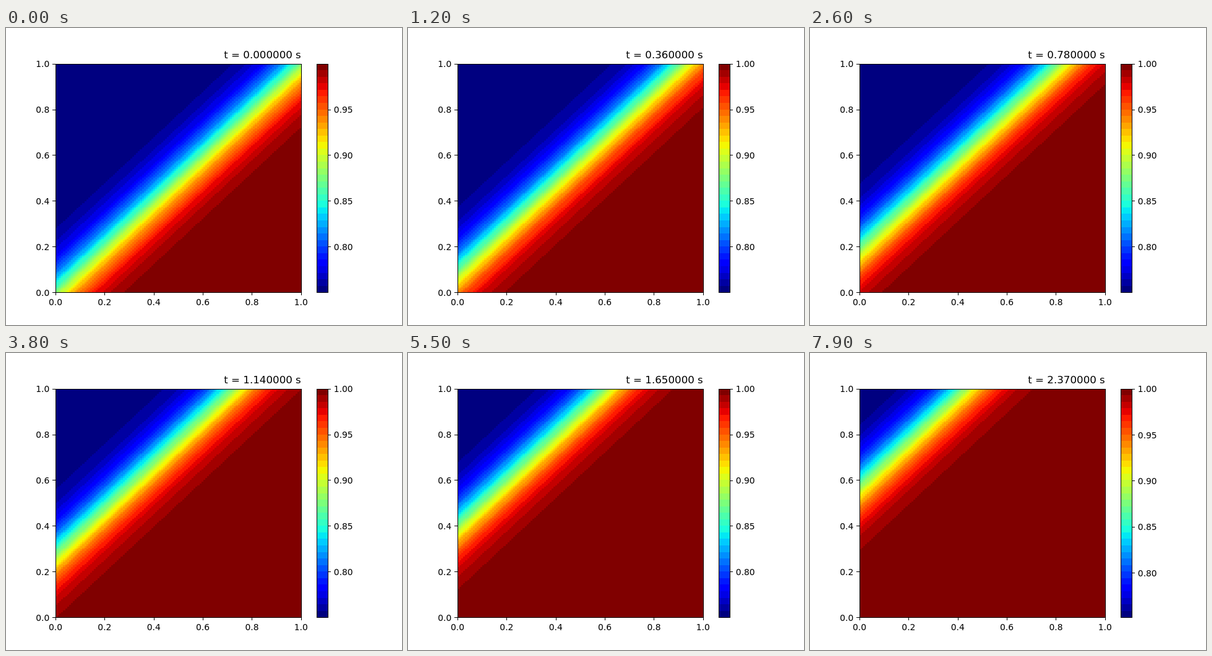
Recreate the animation shown at these times as an HTML page with a canvas. Size 640 px wide and 480 px high, loop 8000 ms.

```html
<!DOCTYPE html>
<html>
<head>
<meta charset="utf-8">
<style>
html, body { margin: 0; width: 100%; height: 100%; overflow: hidden; background: #fff; }
canvas { display: block; }
</style>
</head>
<body>
<canvas id="stage" width="640" height="480"></canvas>
<script>
const ctx = document.getElementById('stage').getContext('2d');
const CELLS = 128, LEVELS = 35, STEEP = 12.5, SPEED = 0.245;
const LEFT = 80, WIDTH = 396.8, TOP = 57.6, BOTTOM = 427.2, HEIGHT = BOTTOM - TOP;
const BAR_LEFT = 502, BAR_RIGHT = 520, TICK = 5;
const FONT = '"DejaVu Sans", sans-serif';

const channel = v => Math.round(255 * Math.max(0, Math.min(1, v)));
const palette = Array.from({ length: LEVELS }, (_, i) => {
  const x = i / (LEVELS - 1);
  const r = Math.min((x - 0.35) / 0.31, 1 - (x - 0.89) / 0.22);
  const g = Math.min((x - 0.125) / 0.25, (0.91 - x) / 0.27);
  const b = Math.min(0.5 + x / 0.22, (0.65 - x) / 0.31);
  return `rgb(${channel(r)},${channel(g)},${channel(b)})`;
});

// Travelling front: d is y - x, the value runs from 1 below to 0.75 above.
const wave = (d, t) => 0.75 + 0.25 / (1 + Math.exp(STEEP * (d - SPEED * t)));

const xEdge = i => Math.round(LEFT + WIDTH * i / CELLS);
const yEdge = j => Math.round(BOTTOM - HEIGHT * j / CELLS);
const labelBase = y => Math.floor(y + 0.25) + 6;

function rect(color, x0, y0, x1, y1) {
  ctx.fillStyle = color;
  ctx.fillRect(x0, y0, x1 - x0, y1 - y0);
}

function text(string, x, y, align, size) {
  ctx.font = `${size}px ${FONT}`;
  ctx.textAlign = align;
  ctx.fillStyle = '#000';
  ctx.fillText(string, x, y);
}

function frame(x0, y0, x1, y1) {
  ctx.strokeStyle = '#000';
  ctx.lineWidth = 1;
  ctx.strokeRect(x0 + 0.5, y0 + 0.5, x1 - x0, y1 - y0);
}

function drawField(t, low, high) {
  const colorOf = d => {
    const level = Math.floor((wave(d / (CELLS - 1), t) - low) / (high - low) * LEVELS);
    return palette[Math.max(0, Math.min(LEVELS - 1, level))];
  };
  const colors = Array.from({ length: 2 * CELLS - 1 }, (_, k) => colorOf(k - CELLS + 1));
  for (let j = 0; j < CELLS; j++) {
    for (let i = 0; i < CELLS; i++) {
      rect(colors[j - i + CELLS - 1], xEdge(i), yEdge(j + 1), xEdge(i + 1), yEdge(j));
    }
  }
  frame(80, 58, 477, 427);
  for (let k = 0; k <= 5; k++) {
    const x = LEFT + WIDTH * k / 5, y = BOTTOM - HEIGHT * k / 5;
    const px = Math.round(x), py = Math.round(y), label = (k / 5).toFixed(1);
    rect('#000', px, 428, px + 1, 428 + TICK - 1);
    rect('#000', 80 - TICK, py, 80, py + 1);
    text(label, x, 448, 'center', 13.89);
    text(label, 70.3, labelBase(y), 'right', 13.89);
  }
}

function drawBar(low, high, showTop) {
  palette.forEach((color, i) => {
    const y = n => Math.round(BOTTOM - HEIGHT * n / LEVELS);
    rect(color, BAR_LEFT, y(i + 1), BAR_RIGHT, y(i));
  });
  frame(BAR_LEFT, 58, BAR_RIGHT, 427);
  for (let k = 16; k <= (showTop ? 20 : 19); k++) {
    const y = TOP + HEIGHT * (high - k / 20) / (high - low);
    const py = Math.round(y);
    rect('#000', BAR_RIGHT + 1, py, BAR_RIGHT + TICK, py + 1);
    text((k / 20).toFixed(2), 529.8, labelBase(y), 'left', 13.89);
  }
}

function draw(step) {
  const t = step * 0.03, low = wave(1, t), high = wave(-1, t);
  rect('#fff', 0, 0, 640, 480);
  drawField(t, low, high);
  drawBar(low, high, step > 0);
  text(`t = ${t.toFixed(6)} s`, 476.8, 49, 'right', 16.67);
}

let shown = -1;
const start = performance.now();
function tick() {
  const step = Math.floor((performance.now() - start) % 8000 / 100);
  if (step !== shown) draw(shown = step);
  requestAnimationFrame(tick);
}
tick();
</script>
</body>
</html>
```
